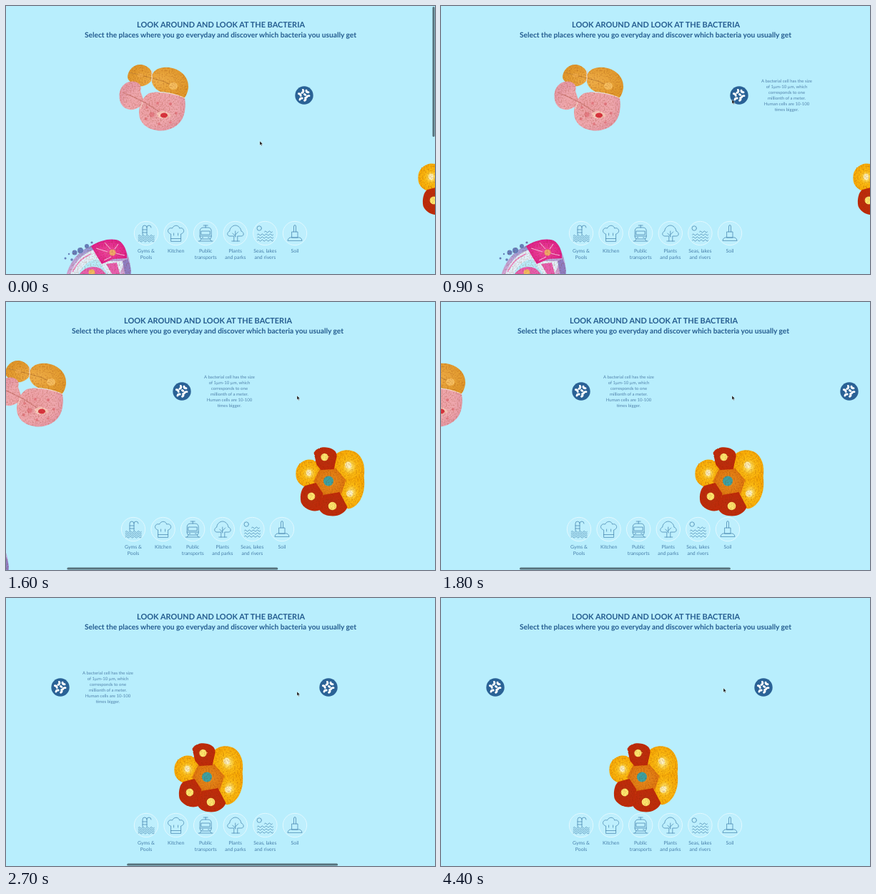
Recreate the animation shown at these times as an HTML page. Size 600 by 375 pixels, loop 4500 ms.

```html
<!DOCTYPE html>
<html lang="en">
<head>
<meta charset="utf-8">
<title>Look at the bacteria</title>
<style>
html, body { margin: 0; width: 100%; height: 100%; overflow: hidden; background: #b8eefd; }
svg { display: block; width: 600px; height: 375px; }
text { font-family: Lato, "Open Sans", sans-serif; fill: #245c8f; text-anchor: middle; text-rendering: geometricPrecision; }
.head { font-weight: 700; }
.label { font-size: 6.9px; fill: #477fab; }
.tip { font-size: 6.05px; fill: #5284ad; }
.line { fill: none; stroke: #4385ae; stroke-width: .75; stroke-linejoin: round; stroke-linecap: round; }
.bar { fill: #55717b; }
</style>
</head>
<body>
<svg viewBox="0 0 600 375">
  <defs>
    <filter id="rough" x="-10%" y="-10%" width="120%" height="120%" color-interpolation-filters="sRGB">
      <feTurbulence type="fractalNoise" baseFrequency=".5" numOctaves="2" seed="4" result="noise"/>
      <feDisplacementMap in="SourceGraphic" in2="noise" scale="1.5" xChannelSelector="R" yChannelSelector="G" result="shape"/>
      <feColorMatrix in="noise" values="0 0 0 0 .5  0 0 0 0 .15  0 0 0 0 0  .7 0 0 0 -.3" result="grain"/>
      <feComposite in="grain" in2="shape" operator="atop"/>
    </filter>
    <radialGradient id="amber"><stop offset="0" stop-color="#f1b14a"/><stop offset="1" stop-color="#e29a2c"/></radialGradient>
    <radialGradient id="pink"><stop offset="0" stop-color="#ee9fa4"/><stop offset=".75" stop-color="#f0a9b0"/><stop offset="1" stop-color="#e89ca8"/></radialGradient>
    <radialGradient id="yellow"><stop offset="0" stop-color="#fff6c4"/><stop offset=".2" stop-color="#ffdc58"/><stop offset=".45" stop-color="#fcbc12"/><stop offset="1" stop-color="#f9ab04"/></radialGradient>
    <radialGradient id="orange"><stop offset="0" stop-color="#e88f1e"/><stop offset="1" stop-color="#e0760e"/></radialGradient>
    <radialGradient id="red"><stop offset="0" stop-color="#b9300f"/><stop offset="1" stop-color="#c02a09"/></radialGradient>
    <radialGradient id="magenta"><stop offset="0" stop-color="#f04ba0"/><stop offset="1" stop-color="#e01f8c"/></radialGradient>
    <linearGradient id="violet" x2="0" y2="1"><stop offset="0" stop-color="#7f8fd2"/><stop offset=".5" stop-color="#b9a9de"/><stop offset="1" stop-color="#dba6d8"/></linearGradient>
    <g id="germ">
      <circle r="12.7" fill="#2a6296"/>
      <path d="M-1.600-7.600q1.400 2.800-1.400 4M3-6.800q0 2.400 3 2.600M-7.600-2.200q2.600 0 2.800 2.700M7 .6q-2.900-.2-3.500 2M-6 6q.6-2.300 3.200-2M.6 7.300q2.200-1.300 1-3.700M.4-1.400l1.400.8" fill="none" stroke="#fff" stroke-width="2.900" stroke-linecap="round"/>
    </g>
  </defs>

  <g id="world">
    <g filter="url(#rough)">
      <path fill="url(#amber)" d="M204 97C208 86 222 84 233 87C248 91 256 102 255 115C254 121 252 126 249 129C238 124 226 120 216 120C207 116 202 108 204 97ZM170 99C171 88 180 81 189 82C197 83 203 88 204 94L203 105C197 112 188 114 182 111C175 107 170 104 170 99Z"/>
      <path fill="url(#pink)" d="M181 106C188 108 190 113 188 119L193 134C190 141 180 146 173 145C161 143 157 132 159 120C162 110 170 104 181 106ZM200 122C212 118 236 122 250 129C252 142 250 155 243 163C235 172 222 176 211 174C197 172 187 164 186 151C186 140 190 128 200 122Z"/>
      <path fill="none" stroke="#c98a35" stroke-width="1.2" d="M172 93L190 97L204 101L222 106L234 112"/>
      <path fill="none" stroke="#d2807f" stroke-width="1.3" d="M163 121L178 127L196 136L216 149"/>
      <path fill="none" stroke="#f9e0d2" stroke-width="1" d="M204 90V105M214 121C228 121 240 124 250 129M191 134L188 144"/>
      <ellipse cx="234" cy="112" rx="6" ry="5" fill="#f8c160"/>
      <ellipse cx="188" cy="97" rx="4" ry="3" fill="#edaa45"/>
      <g fill="#e2707a" opacity=".75">
        <circle cx="204" cy="152" r="3.5"/><circle cx="212" cy="136" r="2"/><circle cx="230" cy="137" r="2.2"/>
        <circle cx="238" cy="150" r="2"/><circle cx="196" cy="158" r="2"/><circle cx="214" cy="165" r="2"/><circle cx="230" cy="163" r="1.8"/><circle cx="197" cy="142" r="1.8"/>
      </g>
      <path fill="#f8c9bb" d="M211 150Q221 143 231 153Q222 161 212 155Z"/>
      <ellipse cx="221" cy="153" rx="5" ry="3.6" fill="#dc3440"/>
    </g>

    <g filter="url(#rough)" transform="translate(220.500)">
      <circle cx="402" cy="251" r="34" fill="#e47c0e"/>
      <g fill="url(#yellow)">
        <path d="M411 214C418 206 433 205 442 212C451 220 453 232 451 246L428 254L410 237Z"/>
        <path d="M419 249L451 244C453 257 451 270 444 280C438 288 430 291 426 288L415 266Z"/>
        <path d="M356 239C356 227 368 218 380 221L393 232L386 252L370 259C360 256 355 248 356 239Z"/>
      </g>
      <path fill="url(#orange)" d="M390 232L412 233L426 249L420 268L402 273L385 266L381 250Z"/>
      <g fill="url(#red)">
        <path d="M381 211C385 204 393 202 402 204C410 206 414 211 413 217L409 234L391 235L385 228Z"/>
        <path d="M369 257L384 253L394 268L390 291C380 295 367 290 363 280C361 270 364 260 369 257Z"/>
        <path d="M394 270L417 266L428 287C424 297 413 301 402 299C394 298 389 293 388 288Z"/>
      </g>
      <g fill="#ffe86e">
        <circle cx="396" cy="217" r="5.2"/><circle cx="377.500" cy="272" r="5.400"/><circle cx="407" cy="285.500" r="5.800"/>
      </g>
      <g fill="#fff8d2" opacity=".7">
        <ellipse cx="374" cy="239" rx="3.500" ry="4.500"/><circle cx="429" cy="228" r="4.500"/><circle cx="431" cy="268" r="4.500"/>
      </g>
      <circle cx="401.500" cy="250.500" r="7" fill="#3aa3a6"/>
    </g>

    <g filter="url(#rough)">
      <path fill="url(#violet)" d="M84 378C88 360 100 343 120 335L160 330C171 344 176 362 174 378Z"/>
      <path fill="#e2f1fc" d="M89 378C95 358 108 346 123 341L136 356L150 357L166 357L158 378Z"/>
      <path fill="#b8eefd" d="M100 378C106 364 116 355 128 354L136 366L146 378Z"/>
      <g fill="#6580bf">
        <circle cx="83" cy="353" r="1.5"/><circle cx="88" cy="347" r="1.2"/><circle cx="96" cy="345" r="3.5"/><circle cx="104" cy="342" r="4"/>
        <circle cx="113" cy="336" r="3"/><circle cx="92" cy="355" r="1.8"/><circle cx="120" cy="331" r="1.6"/>
      </g>
      <path fill="url(#magenta)" d="M119 336C132 327 150 324 159 329C166 334 170 345 169 353L150 354L134 361L127 350Z"/>
      <path fill="#e85fb0" d="M101 378C108 366 120 362 132 367L143 378ZM140 361L155 359L160 378H150Z"/>
      <path fill="#8f7fc6" d="M163 357L170 354C174 362 176 370 174 378H167Z"/>
      <path fill="none" stroke="#ef8cc6" stroke-width="1.8" d="M93 372C99 360 108 351 119 347"/>
      <path fill="none" stroke="#f9b7dc" stroke-width="1.1" d="M126 339L142 344M153 346L166 349M147 351L137 356M138 331L146 340M152 340L157 333"/>
      <circle cx="149" cy="345" r="4.500" fill="#f1a86c"/>
      <circle cx="120" cy="373" r="4.500" fill="#f4bd62"/>
    </g>

    <use href="#germ" x="417" y="125"/>
    <use href="#germ" x="792" y="125"/>
    <g id="tipA"></g>
    <g id="tipB" transform="translate(375)"></g>
  </g>

  <g id="fixed">
    <text class="head" x="300.500" y="30.300" font-size="10.950">LOOK AROUND AND LOOK AT THE BACTERIA</text>
    <text class="head" x="300" y="43.500" font-size="10.2">Select the places where you go everyday and discover which bacteria you usually get</text>
  </g>

  <rect id="barV" class="bar" x="596.500" y="1" width="3" height="182" rx="1.500"/>
  <rect id="barH" class="bar" y="371.500" width="295" height="3" rx="1.500"/>
  <path id="cursor" d="M0 0V5.800L1.300 4.600L2.200 6.600L3.200 6.200L2.300 4.200H4.100Z" fill="#111" stroke="#fff" stroke-width=".4"/>
</svg>
<script>
const $ = id => document.getElementById(id);

const places = [
  ["Gyms &amp;|Pools", "M-5 2V-8q0-3 3-3t3 3M1 2V-8q0-3 3-3t3 3M-5-5H1M-5-1H1" + waves(-11, 3.5) + waves(-11, 6) + waves(-11, 8.5) + waves(-11, 11)],
  ["Kitchen", "M-7 11V1C-14-1-11-9-5-7C-3-12 4-12 5-7C11-9 14-1 7 1V11ZM-7 7.500H7M-3 3V0M3 3V0"],
  ["Public|transports", "M-8-3Q-8-8-3-8H3Q8-8 8-3V5Q8 8 5 8H-5Q-8 8-8 5ZM-6-3H6V2H-6ZM-8 4H8M-3-11H3M0-11V-8M-10 11H10M-6 8L-8 11M6 8L8 11M-5 6h1.500M3.500 6h1.500"],
  ["Plants|and parks", "M-2 11V4H-8C-13 3-11-2-8-3C-8-7-4-11 0-11C4-11 8-7 8-3C12-2 13 4 8 4H3V11M-5 11H6M0 5V-3M0 2L4-2M0 4L-4 0"],
  ["Seas, lakes|and rivers", "M-5-7a3.200 3.200 0 1 1-6.400 0a3.200 3.200 0 1 1 6.400 0" + waves(-1, -2, 2) + waves(-11, 2) + waves(-11, 6) + waves(-11, 10)],
  ["Soil", "M-1.500-2V-9q0-2.500 1.500-2.500t1.500 2.500V-2M-4-2H4V6H-4ZM-10 10Q-9 5-4 6H4Q9 5 10 10Z"]
];
const fact = ["A bacterial cell has the size", "of 1µm-10 µm, which", "corresponds to one", "millionth of a meter.", "Human cells are 10-100", "times bigger."];

function waves(x, y, n = 4) {
  return `M${x} ${y}` + "q1.400-2.200 2.800 0t2.800 0".repeat(n);
}

function lines(rows, x, y, step, name) {
  return rows.map((row, i) => `<text class="${name}" x="${x}" y="${y + i * step}">${row}</text>`).join("");
}

$("fixed").innerHTML += places.map(([name, icon], i) => {
  const x = 196 + i * 41.6;
  return `<g transform="translate(${x} 318)"><circle r="16.700" fill="#fff" fill-opacity=".08" stroke="#e2f9ff"/>
    <path class="line" d="${icon}"/></g>` + lines(name.split("|"), x, 345.3, 9, "label");
}).join("");
$("tipA").innerHTML = $("tipB").innerHTML = lines(fact, 483.5, 107, 8, "tip");

// Each track is a list of [time, value], linear in between.
const tracks = {
  scroll: [[1200, 0], [1300, 24], [1400, 75], [1500, 128], [1600, 171], [1700, 203], [1800, 221], [1900, 232], [2000, 240], [2200, 247.5], [2300, 284], [2400, 318], [2500, 334], [2600, 340], [2700, 341]],
  lag: [[1200, 0], [1300, -18], [1400, -42], [1500, -32], [1600, -18], [1800, -3], [2000, 0], [2200, 0], [2300, -12], [2400, -6], [2600, 0]],
  x: [[100, 355], [700, 407], [3100, 407], [3500, 443], [3900, 443], [4300, 395]],
  y: [[100, 189], [700, 131], [3100, 131], [3500, 124], [3900, 124], [4300, 126]],
  tipA: [[600, 0], [900, 1], [3100, 1], [3400, 0]],
  tipB: [[3300, 0], [3600, 1], [4000, 1], [4300, 0]],
  barV: [[300, 1], [600, 0]],
  barH: [[1200, 0], [1300, 1], [3000, 1], [3300, 0]]
};

function at(keys, t) {
  const i = keys.findIndex(key => key[0] > t);
  if (i < 0) return keys[keys.length - 1][1];
  if (!i) return keys[0][1];
  const [t0, a] = keys[i - 1], [t1, b] = keys[i];
  return a + (b - a) * (t - t0) / (t1 - t0);
}

const start = performance.now();
function draw() {
  const t = Math.floor(Math.max(0, performance.now() - start) % 4500 / 100) * 100;
  const get = name => at(tracks[name], t);
  const move = (id, x, y = 0) => $(id).setAttribute("transform", `translate(${x} ${y})`);
  const scroll = get("scroll");
  move("world", -scroll);
  move("fixed", get("lag"));
  move("cursor", get("x"), get("y"));
  $("barH").setAttribute("x", 1 + scroll * .493);
  for (const id of ["tipA", "tipB", "barV", "barH"]) $(id).setAttribute("opacity", get(id));
  requestAnimationFrame(draw);
}
draw();
</script>
</body>
</html>
```
